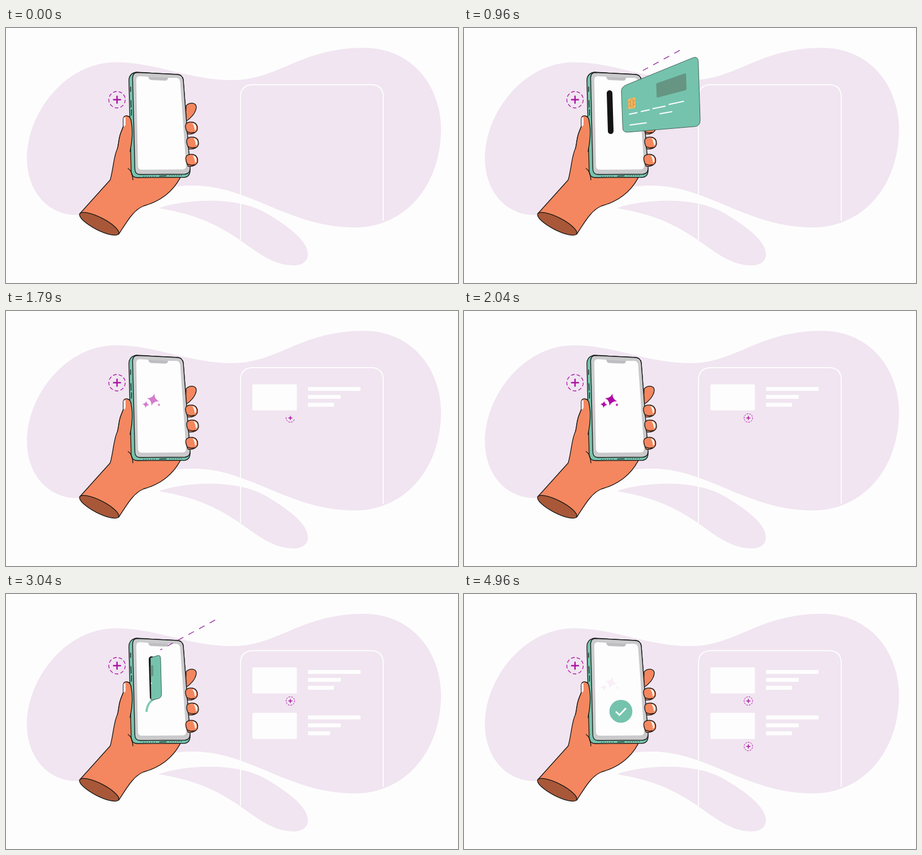
An HTML page that plays this animation: 798 px wide and 450 px high, repeating every 5 s.

```html
<!DOCTYPE html>
<html lang="en">
<head>
<meta charset="utf-8">
<title>Adding cards to a phone wallet</title>
<style>
  html, body { margin: 0; width: 100%; height: 100%; overflow: hidden; background: #fdfdfd; }
  svg { display: block; width: 100vw; height: 100vh; }
  .line { fill: none; stroke: #141414; stroke-width: 1.3; stroke-linecap: round; stroke-linejoin: round; }
  .skin { fill: #f4875f; }
  .inked { stroke: #141414; stroke-width: 1.3; stroke-linejoin: round; }
  .plum { fill: none; stroke: #ab12a4; }
</style>
</head>
<body>
<svg viewBox="0 0 798 450">
  <defs>
    <clipPath id="mouth"><path d="M254 30H450V230H257Z"/></clipPath>
    <g id="finger">
      <path class="skin inked" d="M-10 -7C-5 -12 10 -12 10 1C10 9 0 12 -7 11L-9 6C-11 2 -12 -4 -10 -7Z"/>
      <path d="M1 -8C7 -8 9 -2 7 4L5 4C5 0 4 -4 1 -8Z" fill="#fff6ee"/>
      <path class="line" d="M-8 7Q-2 10 4 8"/>
    </g>
    <path id="star" d="M0 -10Q1.6 -1.6 10 0Q1.6 1.6 0 10Q-1.6 1.6 -10 0Q-1.6 -1.6 0 -10Z"/>
  </defs>

  <rect width="798" height="450" fill="#fdfdfd"/>
  <g fill="#f0e5f0">
    <path d="M128 330C76 332 37 290 37 230C37 150 105 60 195 60.500C268 61 323 92 400 92C480 92 520 35 632 35C715 35 768 100 768 180C767 276 707 352 615 352C500 352 430 278 330 278C240 278 200 327 128 330Z"/>
    <path d="M270 318C300 306 400 292 460 327C497 349 533 375 533 400C533 412 522 419 508 419C460 419 430 380 375 351C340 333 310 325 270 318Z"/>
  </g>
  <path d="M414 374V122Q414 100 437 100H644Q666 100 666 122V340" fill="none" stroke="#fdfdfd" stroke-width="2"/>
  <g id="rows"></g>

  <g class="plum">
    <circle cx="196" cy="126.500" r="14.500" stroke-width="1.300" stroke-dasharray="6.500 3.610"/>
    <path d="M190 126.500H202M196 120.500V132.500" stroke-width="2.500" stroke-linecap="round"/>
  </g>

  <!-- hand and phone -->
  <path class="skin inked" d="M318 137C326 130 336 132 336 140C335 150 326 160 317 165Z"/>
  <path class="skin inked" d="M130 328L184 268C190 247 190 225 197 212C199 204 199 194 203 184L207 174H240V255H312C298 288 272 306 243 314C225 321 214 341 199 364Z"/>
  <ellipse class="inked" cx="164.500" cy="345.500" rx="38.500" ry="11" transform="rotate(27 164.500 345.500)" fill="#a85838"/>
  <path class="inked" fill="#75c3ad" d="M230 78Q217 80 217 93L221 254Q222 264 232 264L316 263.500Q325 262 325 251L313 92Q312 83 303 82Z"/>
  <path class="inked" fill="#cacacc" d="M231 78.500L303 82Q312 83 313 92L325 247Q325 257 316 258L237 258.500Q228 258.500 227.500 249L223.500 88Q224 79 231 78.500Z"/>
  <path fill="#fdfdfd" d="M236 85L251 86Q252 92 257 92L281 93Q286 93 286 88L301 88Q307 89 307.500 95L318 243Q318 249 312 249.500L240 250Q233.500 250 233 244L230 92Q230 85 236 85Z"/>
  <path d="M252 86.500L286 88Q285 92 280 92L257 91Q253 91 252 86.500Z" fill="#bdbdc1"/>
  <path class="line" d="M220 104V112M220.500 128L221 140M221.500 144V154M271 261.300L283 260.800"/>
  <path class="line" stroke-dasharray=".1 4" d="M243 261.700L265 261.400M289 260.800L312 260.300"/>
  <path class="skin" d="M197 212C199 204 199 194 203 184L207 174V160C207 153 220 152 221 165C224 178 223 198 219 218L210 232Z"/>
  <path class="line" d="M197 212C199 204 199 194 203 184L207 174V160C207 153 220 152 221 165C224 178 223 198 219 218M215.500 248Q223 252 224 268"/>
  <path d="M207.500 158L211 157.500V171Q209 175 207.500 173Z" fill="#fdfdfd"/>
  <use href="#finger" x="328" y="176"/>
  <use href="#finger" x="330" y="202.500"/>
  <use href="#finger" x="328.500" y="233"/>

  <path id="slot" stroke="#141414" stroke-width="10" stroke-linecap="round"/>
  <path id="ribbon" d="M264 184C256 187 249 195 248 208" fill="none" stroke="#84cab6" stroke-width="4" pathLength="1"/>
  <g id="card" clip-path="url(#mouth)">
    <path id="face" fill="#75c3ad" stroke="#35564d" stroke-width=".9"/>
    <path id="panel" fill="#669583"/>
    <path id="chip" fill="#f3b65c"/>
    <path id="chipLines" fill="none" stroke="#b98140" stroke-width=".7"/>
    <path id="print" fill="none" stroke="#fdfdfd" stroke-width="2"/>
  </g>
  <path id="trail" fill="none" stroke="#96309a" stroke-width="1.400" stroke-dasharray="11 10.300"/>

  <g id="stars" fill="#b005a5">
    <use href="#star" transform="translate(259.500 156.500) rotate(14) scale(1.100)"/>
    <use href="#star" transform="translate(247 165) rotate(8) scale(.62)"/>
    <use href="#star" transform="translate(270 165.500) rotate(14) scale(.28)"/>
  </g>
  <circle id="badge" cx="277" cy="207" fill="#75c3ad"/>
  <path id="tick" d="M268 207.500L274.500 213.500L286 201.500" fill="none" stroke="#fdfdfd" stroke-width="3" pathLength="1"/>
</svg>

<script>
  const LOOP = 5000, CYCLE = 1870, ROW_GAP = 1400;
  const $ = id => document.getElementById(id);
  const set = (el, attrs) => { for (const k in attrs) el.setAttribute(k, attrs[k]); };
  const show = (el, on) => set(el, { visibility: on ? 'visible' : 'hidden' });
  const mix = (a, b, k) => a + (b - a) * k;
  const ramp = (t, a, b) => Math.min(1, Math.max(0, (t - a) / (b - a)));
  const easeOut = k => 1 - (1 - k) ** 2;

  // Each key is [time, value, value, ...]; returns the interpolated values.
  function tween(t, keys) {
    let i = 1;
    while (i < keys.length - 1 && t > keys[i][0]) i++;
    const a = keys[i - 1], b = keys[i], k = ramp(t, a[0], b[0]);
    return a.slice(1).map((v, n) => mix(v, b[n + 1], k));
  }

  function add(parent, tag, attrs) {
    const el = document.createElementNS('http://www.w3.org/2000/svg', tag);
    set(el, attrs);
    return parent.appendChild(el);
  }

  const rows = [0, 1].map(n => {
    const y = 129.5 + n * 80.3, white = '#fdfdfd';
    const bars = [93, 58, 46].map((w, i) => ({
      w, el: add($('rows'), 'rect', { x: 533, y: y + 4.5 + i * 14, height: 7, rx: 1, fill: white })
    }));
    const thumb = add($('rows'), 'rect', { x: 435, width: 78.5, rx: 1.5, fill: white });
    const plus = add($('rows'), 'g', { class: 'plum' });
    const ring = add(plus, 'path', { 'stroke-width': 1 });
    const cross = add(plus, 'path', { d: 'M-3.5 0H3.5M0 -3.5V3.5', 'stroke-width': 1.5 });
    return { y, bars, thumb, plus, ring, cross, start: 1140 + n * ROW_GAP };
  });

  function drawRow(row, time) {
    const t = time - row.start;
    const h = 46 * easeOut(ramp(t, 0, 185));
    set(row.thumb, { y: row.y + 23 - h / 2, height: h });
    row.bars.forEach(({ w, el }, i) =>
      set(el, { width: w * easeOut(ramp(t, 150 + i * 100, 395 + i * 100)) }));

    const grown = ramp(t, 560, 740);
    show(row.plus, grown > 0);
    set(row.plus, { transform: `translate(502 ${row.y + 59.3})` });
    set(row.cross, { transform: `scale(${ramp(t, 540, 640)})` });
    let d = '';
    for (let i = 0; i < Math.round(10 * grown); i++) {
      const a = i * Math.PI / 5 + t * 0.0006, b = a + 0.4;
      const at = q => `${7.5 * Math.cos(q)} ${7.5 * Math.sin(q)}`;
      d += `M${at(a)}A7.5 7.5 0 0 1 ${at(b)}`;
    }
    set(row.ring, { d });
  }

  // Corners: top left, top right, bottom right, bottom left.
  const hidden = [180, 132, 253, 109, 255, 184, 182, 204];
  const cardKeys = [
    [540, ...hidden],
    [760, 274, 108, 400, 52, 403, 172, 276, 184.5],
    [860, 281, 103, 424, 46, 428, 172, 284, 185],
    [960, 278, 104, 414, 48.5, 418, 173, 281, 184.5],
    [1170, 192, 133, 273, 107, 275, 183, 194, 203],
    [1250, ...hidden]
  ];

  function drawCard(t) {
    const live = t > 540 && t < 1250;
    show($('card'), live);
    if (!live) return;
    const c = tween(t, cardKeys);
    const at = (u, v) => [0, 1].map(n =>
      mix(mix(c[n], c[n + 2], u), mix(c[n + 6], c[n + 4], u), v).toFixed(2)).join(' ');
    const box = (u, v, U, V, r, s) =>
      `M${at(u + r, v)}L${at(U - r, v)}Q${at(U, v)} ${at(U, v + s)}L${at(U, V - s)}Q${at(U, V)} ${at(U - r, V)}` +
      `L${at(u + r, V)}Q${at(u, V)} ${at(u, V - s)}L${at(u, v + s)}Q${at(u, v)} ${at(u + r, v)}Z`;
    const rule = (u, U, v) => `M${at(u, v)}L${at(U, v)}`;
    const chipRules = rule(.08, .112, .38) + rule(.08, .112, .45) + rule(.145, .175, .38) + rule(.145, .175, .45);
    set($('face'), { d: box(0, 0, 1, 1, .07, .09) });
    set($('panel'), { d: box(.45, .185, .837, .44, .012, .02) });
    set($('chip'), { d: box(.08, .31, .175, .525, .015, .025) });
    set($('chipLines'), { d: box(.112, .34, .145, .49, .01, .02) + chipRules });
    set($('print'), {
      d: rule(.087, .196, .628) + rule(.24, .355, .622) + rule(.39, .56, .615) + rule(.6, .8, .6) +
         rule(.09, .31, .853) + rule(.48, .645, .728)
    });
  }

  function drawTrail(t) {
    const [tail, head] = tween(t, [
      [870, 391, 391], [960, 381, 316], [1080, 380, 290], [1170, 370, 272.5], [1300, 268, 268]
    ]);
    const point = x => `${x} ${34 + (391 - x) * .545}`;
    show($('trail'), t > 870 && t < 1300);
    set($('trail'), { d: `M${point(tail)}L${point(head)}` });
  }

  function drawSlot(t) {
    const [open] = tween(t, [[330, 0], [520, 1], [1260, 1], [1400, 0]]);
    const half = 33.5 * open;
    show($('slot'), open > 0);
    set($('slot'), { d: `M${258 - open} ${148.5 - half}L${258 + open} ${148.5 + half}`, 'stroke-width': 10 * Math.min(1, open * 3) });

    const [from, to] = tween(t, [[1090, 0, 0], [1165, 0, 1], [1210, .1, 1], [1300, 1, 1]]);
    show($('ribbon'), t > 1090 && t < 1300);
    set($('ribbon'), { 'stroke-dasharray': `0 ${from} ${to - from} 2` });
  }

  function drawConfirmation(t) {
    const [alpha] = tween(t, [
      [1650, 0], [1920, 1], [2050, 1], [2250, 0], [3520, 0], [3790, 1], [4600, 1], [4980, 0]
    ]);
    set($('stars'), { opacity: alpha });
    const [r] = tween(t, [[3810, 0], [3960, 23], [4000, 22], [4090, 20.3]]);
    set($('badge'), { r });
    const [drawn] = tween(t, [[3950, 0], [4000, .38], [4130, 1]]);
    show($('tick'), drawn > 0);
    set($('tick'), { 'stroke-dasharray': `${drawn} 2` });
  }

  function render(t) {
    const local = t < CYCLE ? t : t - CYCLE;
    rows.forEach(row => drawRow(row, t));
    drawSlot(local);
    drawCard(local);
    drawTrail(local);
    drawConfirmation(t);
  }

  const begin = performance.now();
  function tick() {
    render((performance.now() - begin) % LOOP);
    requestAnimationFrame(tick);
  }
  tick();
</script>
</body>
</html>
```
